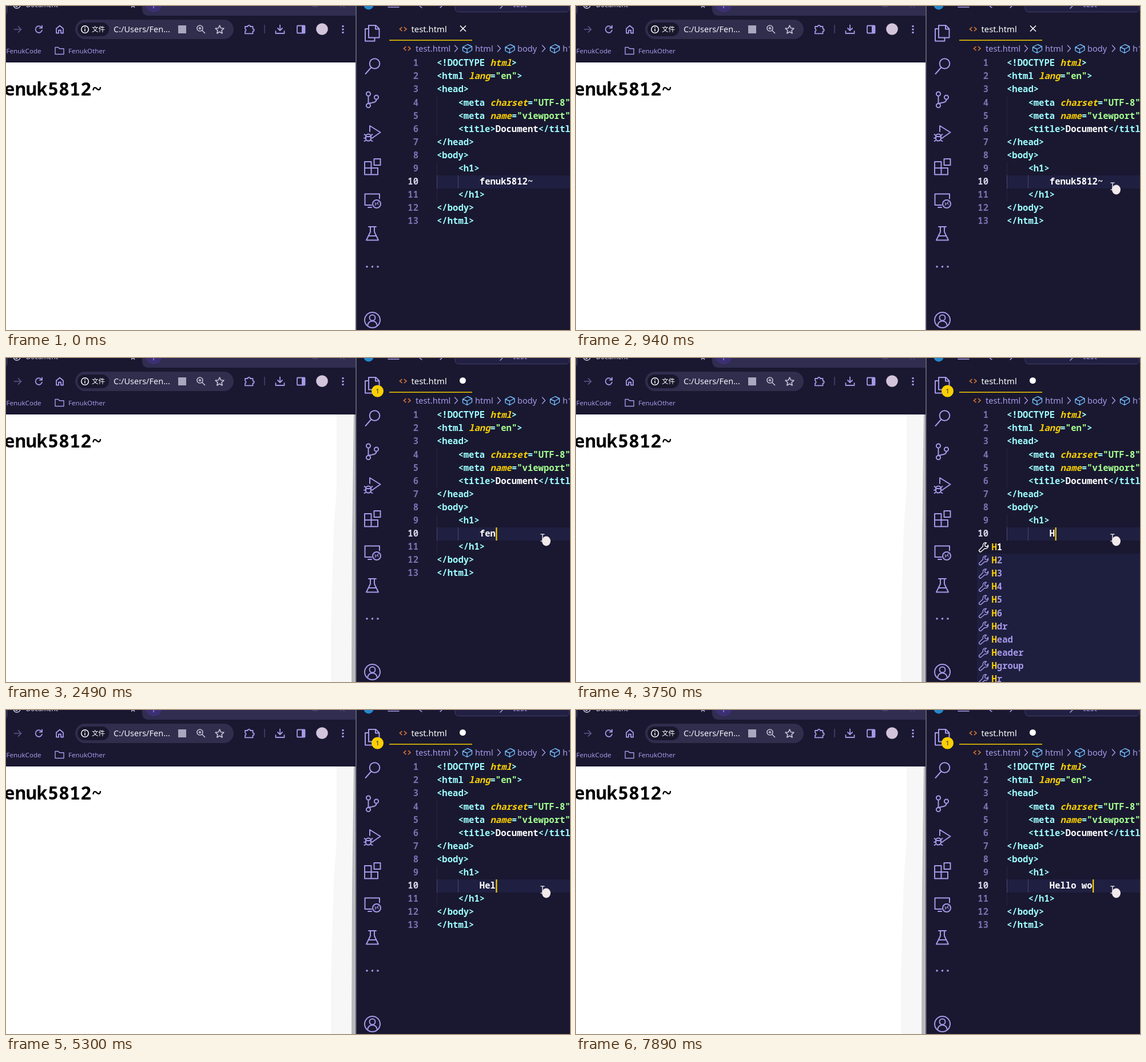
Recreate the animation shown at these times as an HTML page. Size 986x568 px, loop 8000 ms.

```html
<!DOCTYPE html>
<html lang="en">
<head>
<meta charset="utf-8">
<title>Live edit</title>
<style>
html, body { margin: 0; width: 100%; height: 100%; overflow: hidden; background: #191830; }
svg { display: block; width: 986px; height: 568px; }
text { white-space: pre; font-family: "Noto Sans", "Open Sans", sans-serif; }
.mono text, text.mono { font-family: "Noto Sans Mono", "DejaVu Sans Mono", monospace; font-weight: 700; }
.code { font-size: 15.58px; }
.c { fill: #9effff; }
.y { fill: #fad000; }
.g { fill: #a5ff90; }
.w { fill: #fff; }
.p { fill: #a599e9; }
i, .it { font-style: italic; }
.line { fill: none; stroke: #a599e9; stroke-width: 2; stroke-linejoin: round; stroke-linecap: round; }
</style>
</head>
<body>
<svg viewBox="0 0 986 568">
  <rect width="986" height="568" fill="#191830"/>

  <!-- browser -->
  <path d="M238 0H611V17H250Q238 17 238 5Z" fill="#302d50"/>
  <path d="M0 0H3V8Q3 13 0 15Z" fill="#302d50"/>
  <circle cx="258" cy="-4" r="15" fill="#3d2f74"/>
  <path d="M258 -4V4" stroke="#8f7ee0" stroke-width="1.6"/>
  <g fill="none" stroke="#cfcbe6" stroke-width="1.5">
    <circle cx="19" cy="-2" r="6"/>
    <path d="M14 -1L19 1L21 -3M219 2.500l3 -3l3 3"/>
  </g>
  <path d="M536 1h9M584 3l4 -4l4 4" fill="none" stroke="#5d5883" stroke-width="1"/>
  <text x="35" y="1.500" font-size="11.4" fill="#e6e4f2">Document</text>

  <rect x="121" y="24" width="277" height="34" rx="17" fill="#302d4d"/>
  <rect x="125" y="29" width="55" height="24" rx="12" fill="#19172c"/>
  <g fill="none" stroke="#fff" stroke-width="1.5">
    <circle cx="138" cy="41" r="6.300"/>
    <path d="M138 40v4.500M138 36.800v1.700"/>
  </g>
  <text x="150" y="45.200" font-size="11.6" fill="#fff" style="font-family:'Noto Sans CJK SC','Noto Sans CJK',sans-serif">文件</text>
  <text x="188" y="46" font-size="14.5" fill="#f4f3fa">C:/Users/Fen...</text>
  <rect x="301" y="34" width="14" height="14" fill="#aaa6bd"/>
  <g fill="none" stroke="#c7c3da" stroke-width="1.6">
    <circle cx="339" cy="39" r="5"/>
    <path d="M342.800 42.800l5.200 5.200M336.500 39h5M339 36.500v5"/>
    <path stroke-linejoin="round" d="M373.500 34l2.200 4.800 5.200.5-3.900 3.500 1.100 5.200-4.600-2.700-4.600 2.700 1.100-5.200-3.900-3.500 5.200-.5z"/>
  </g>
  <path class="line" stroke-opacity=".5" style="stroke-width:1.700" d="M14.500 41h12M21.500 36l5 5-5 5"/>
  <g class="line" style="stroke-width:1.800">
    <path d="M62 37.500a5.800 5.800 0 1 0 1 5M63 34.500v4.200h-4.200"/>
    <path d="M88 39.500l6-5 6 5v8h-4v-5h-4v5h-4z"/>
    <path d="M418 36h4.500a2.200 2.200 0 0 1 4.400 0h4.600v4a2.200 2.200 0 0 1 0 4.400v4h-13.500v-4a2.300 2.300 0 0 0 0-4.400z"/>
    <path d="M479 33.500v9M475 39l4 4 4-4M471.500 44v4h15v-4"/>
    <rect x="509" y="34.500" width="13.500" height="13" rx="1"/>
  </g>
  <path d="M517 34.500h6v13h-6z" class="p"/>
  <path d="M452 33v15" stroke="#4a4570" stroke-width="1.500"/>
  <circle cx="552.500" cy="40.500" r="10.300" fill="#d3c4dc"/>
  <g class="p"><circle cx="589" cy="35.500" r="1.800"/><circle cx="589" cy="41" r="1.800"/><circle cx="589" cy="46.500" r="1.800"/></g>
  <text class="p" x="0.500" y="82.500" font-size="11.600">FenukCode</text>
  <path class="line" style="stroke-width:1.400" d="M86 72.500h5.500l2 2.200h7.500v9.800h-15z"/>
  <text class="p" x="109" y="82.500" font-size="11.600">FenukOther</text>

  <rect y="99" width="611" height="469" fill="#fff"/>
  <g id="shade">
    <path d="M578 99H611V568H568V470L573 300L578 230Z" fill="#f7f7f7"/>
    <path d="M608 99H611V568H604L605 320Z" fill="#b9b9bd"/>
  </g>
  <text class="mono" x="-22.500" y="157" font-size="31.800" fill="#000">fenuk5812~</text>
  <path d="M612 0V568" stroke="#6d6b7a" stroke-width="1.600"/>

  <!-- editor window -->
  <circle cx="634" cy="-2" r="8.500" fill="#2489ca"/>
  <path class="line" style="stroke-width:1.600" d="M668 2H687M727 3l-5 -4M759 3l4 -4"/>
  <rect x="785" y="-12" width="200" height="22.500" rx="6" fill="#222042" stroke="#413d68"/>
  <path class="line" style="stroke-width:1.500" d="M864 4l5 -5"/>
  <text x="886" y="2" font-size="14" class="p">test</text>

  <g class="line">
    <path d="M634 40h-6v21.500h16.500v-5M634 34h12.500l6 6v15.500h-18.500zM646 34v6.500h6.500"/>
    <circle cx="644.500" cy="101" r="8.800"/><path d="M638.500 107.500l-10 11.500"/>
    <circle cx="633.500" cy="154" r="3.600"/><circle cx="633.500" cy="174.500" r="3.600"/><circle cx="647.500" cy="160" r="3.600"/>
    <path d="M633.500 158v13M647.500 164c0 5-6 5-12 6.500"/>
    <path d="M636 220v-10l18.500 11.500-13 9M629 229a4.500 4.500 0 0 1 9 0v3a4.500 4.500 0 0 1-9 0zM629 229h9M626.500 225l2.500 2M640.500 225l-2.500 2M626 231.500h3M638 231.500h3M626.500 237l3-2M640.500 237l-3-2"/>
    <path d="M627 273h11.500v22.500h-11.500zM627 284h23v11.500h-23M643.500 268h11v11h-11z"/>
    <path d="M639 349h-11.500v-19.500h25.500v8M633 353h6"/>
    <circle cx="648" cy="347" r="7"/>
    <path style="stroke-width:1.300" d="M645 345l2.200 2.200-2.200 2.200M651 343.500l-2.200 2.200 2.200 2.200"/>
    <path d="M634 387h13M637 387v9l-7 14.500h21l-7-14.500v-9M634 403h13"/>
    <circle cx="640.500" cy="550.500" r="13.500"/><circle cx="640.500" cy="546.500" r="5"/>
    <path d="M632 560.500c1-11 16-11 17 0"/>
  </g>
  <g class="p"><circle cx="631" cy="457" r="1.800"/><circle cx="640.500" cy="457" r="1.800"/><circle cx="650" cy="457" r="1.800"/></g>
  <g id="badge">
    <circle cx="649.500" cy="58" r="10.500" class="y"/>
    <text x="649.500" y="62.200" font-size="11.500" text-anchor="middle" fill="#2b2760">1</text>
  </g>

  <path d="M670 60H815" stroke="#fad000" stroke-width="1.600"/>
  <path d="M692.500 37l-4 3.500 4 3.500M696 37l4 3.500-4 3.500M699.500 71l-4 3.500 4 3.500M703 71l4 3.500-4 3.500" fill="none" stroke="#e37933" stroke-width="1.600"/>
  <text x="708.500" y="46" font-size="14.800" class="w">test.html</text>
  <path id="close" d="M794 34.500l10 10M804 34.500l-10 10" stroke="#fff" stroke-width="1.600"/>
  <circle id="dirty" cx="798.500" cy="39.500" r="5.500" class="w"/>
  <g class="p" font-size="14.600">
    <text x="716" y="80">test.html</text><text x="820" y="80">html</text>
    <text x="894" y="80">body</text><text x="973" y="80">h1</text>
  </g>
  <g id="crumbs"></g>

  <rect x="753" y="297" width="233" height="23" fill="#1f1f41"/>
  <path d="M753.500 158V227M753.500 273V343" stroke="#2c2342"/>
  <path d="M753.500 297V320M790.500 297V320" stroke="#4c4870"/>
  <g id="code" class="mono code"></g>
  <rect id="caret" y="297" width="2.200" height="23" class="y"/>
  <g id="popup" class="mono code"></g>

  <g id="mouse">
    <path d="M-3.500 -6H3.500M0 -6V6M-3.500 6H1" fill="none" stroke="#d8d6e2" stroke-width="1.500"/>
    <ellipse cx="6.500" cy="6" rx="7.500" ry="8.500" fill="#f1e9ea"/>
  </g>
</svg>
<script>
const LOOP = 8000, CHAR = 9.348, ROW = 23.1, WORD = 'fenuk5812~', HELLO = 'Hello wo';
const $ = id => document.getElementById(id);

function add(parent, tag, attrs, text) {
  const el = document.createElementNS('http://www.w3.org/2000/svg', tag);
  for (const k in attrs) el.setAttribute(k, attrs[k]);
  if (text !== undefined) el.textContent = text;
  parent.append(el);
  return el;
}

// Each part starts with its colour letter; yellow code is italic.
const lines = [
  [0, 'c<!DOCTYPE ', 'yhtml', 'c>'],
  [0, 'c<html ', 'ylang', 'c=', 'g"en"', 'c>'],
  [0, 'c<head>'],
  [4, 'c<meta ', 'ycharset', 'c=', 'g"UTF-8"', 'c>'],
  [4, 'c<meta ', 'yname', 'c=', 'g"viewport"'],
  [4, 'c<title>', 'wDocument', 'c</title>'],
  [0, 'c</head>'],
  [0, 'c<body>'],
  [4, 'c<h1>'],
  [8, 'w'],
  [4, 'c</h1>'],
  [0, 'c</body>'],
  [0, 'c</html>']
];

let typed;
lines.forEach(([indent, ...parts], i) => {
  const y = 105.2 + ROW * i;
  add($('code'), 'text', { x: 721, y, 'text-anchor': 'end', fill: i === 9 ? '#d6d3e6' : '#7a70b0' }, i + 1);
  const row = add($('code'), 'text', { x: 753 + indent * CHAR, y });
  for (const p of parts) {
    const span = add(row, 'tspan', { class: p[0] === 'y' ? 'y it' : p[0] }, p.slice(1));
    if (i === 9) typed = span;
  }
});

for (const x of [787, 862, 940])
  add($('crumbs'), 'path', { d: `M${x - 2.5} 69l5 5.500l-5 5.500`, class: 'line', style: 'stroke-width:1.400' });
for (const x of [806.5, 881, 959.5])
  add($('crumbs'), 'path', {
    d: `M${x - 8} 72l8.500 -4.500l7.500 3.500v6.500l-8.500 5l-7.500 -4zM${x - 8} 72l7.500 3.500l8.500 -4.500M${x - 0.5} 75.500v7`,
    class: 'line', style: 'stroke:#75beff;stroke-width:1.400'
  });

const menus = {
  H: 'H1 H2 H3 H4 H5 H6 Hdr Head Header Hgroup Hr'.split(' '),
  He: ['Head', 'Header'],
  w: ['wbr', 'w']
};

function drawMenu(key) {
  const box = $('popup');
  box.replaceChildren();
  if (!key) return;
  const items = menus[key];
  add(box, 'rect', { x: 701, y: 320, width: 285, height: ROW * items.length + 1, fill: '#1e1e3f' });
  add(box, 'rect', { x: 701, y: 320, width: 285, height: ROW, fill: '#191830' });
  items.forEach((item, i) => {
    const tone = i ? '#a599e9' : '#fff', y = 332 + ROW * i;
    add(box, 'path', {
      d: 'M-7 5l7 -7c-1 -4 2 -7 6 -6l-3 3l1 3l3 1l2 -3c1 4 -2 7 -6 6l-7 6q-3 0 -3 -3z',
      transform: `translate(711.500 ${y})`, class: 'line', style: `stroke:${tone};stroke-width:1.400`
    });
    const row = add(box, 'text', { x: 726.5, y: y + 5, fill: tone });
    add(row, 'tspan', { class: 'y' }, key);
    add(row, 'tspan', {}, item.slice(key.length));
  });
}

// time, word, letters shown, caret on, menu
const steps = [
  [0, WORD, 10, 0], [1570, WORD, 10, 1], [1840, WORD, 9, 1],
  [2310, WORD, 8, 1], [2360, WORD, 7, 1], [2400, WORD, 6, 1],
  [2450, WORD, 4, 1], [2490, WORD, 3, 1], [2540, WORD, 2, 1],
  [2770, WORD, 1, 1], [3150, WORD, 0, 1],
  [3620, HELLO, 1, 1], [3700, HELLO, 1, 1, 'H'],
  [4140, HELLO, 2, 1, 'He'], [4400, HELLO, 3, 1],
  [4890, HELLO, 2, 1], [5300, HELLO, 3, 1], [5440, HELLO, 4, 1],
  [5590, HELLO, 5, 1], [6010, HELLO, 6, 1], [6520, HELLO, 6, 0],
  [6990, HELLO, 6, 1], [7550, HELLO, 7, 1], [7600, HELLO, 7, 1, 'w'],
  [7890, HELLO, 8, 1]
];

const show = (id, on) => $(id).setAttribute('visibility', on ? 'visible' : 'hidden');

function moveMouse(t) {
  show('mouse', t >= 340);
  const k = Math.min(1, Math.max(0, (t - 340) / 560));
  const left = (1 - k) ** 2;
  const x = 938 - 38 * left, y = (t < 1270 ? 316 : 315) + 264 * left;
  $('mouse').setAttribute('transform', `translate(${x} ${y})`);
}

let last;
function frame(now) {
  const t = Math.max(0, now - start) % LOOP;
  moveMouse(t);
  show('shade', t >= 1050);
  const step = steps.findLast(s => s[0] <= t);
  if (step !== last) {
    const [at, word, count, caret, menu] = last = step;
    typed.textContent = word.slice(0, count);
    $('caret').setAttribute('x', 828.3 + count * CHAR);
    show('caret', caret);
    drawMenu(menu);
    const edited = at >= 1840;
    show('badge', edited);
    show('dirty', edited);
    show('close', !edited);
  }
  requestAnimationFrame(frame);
}
const start = performance.now();
frame(start);
</script>
</body>
</html>
```
